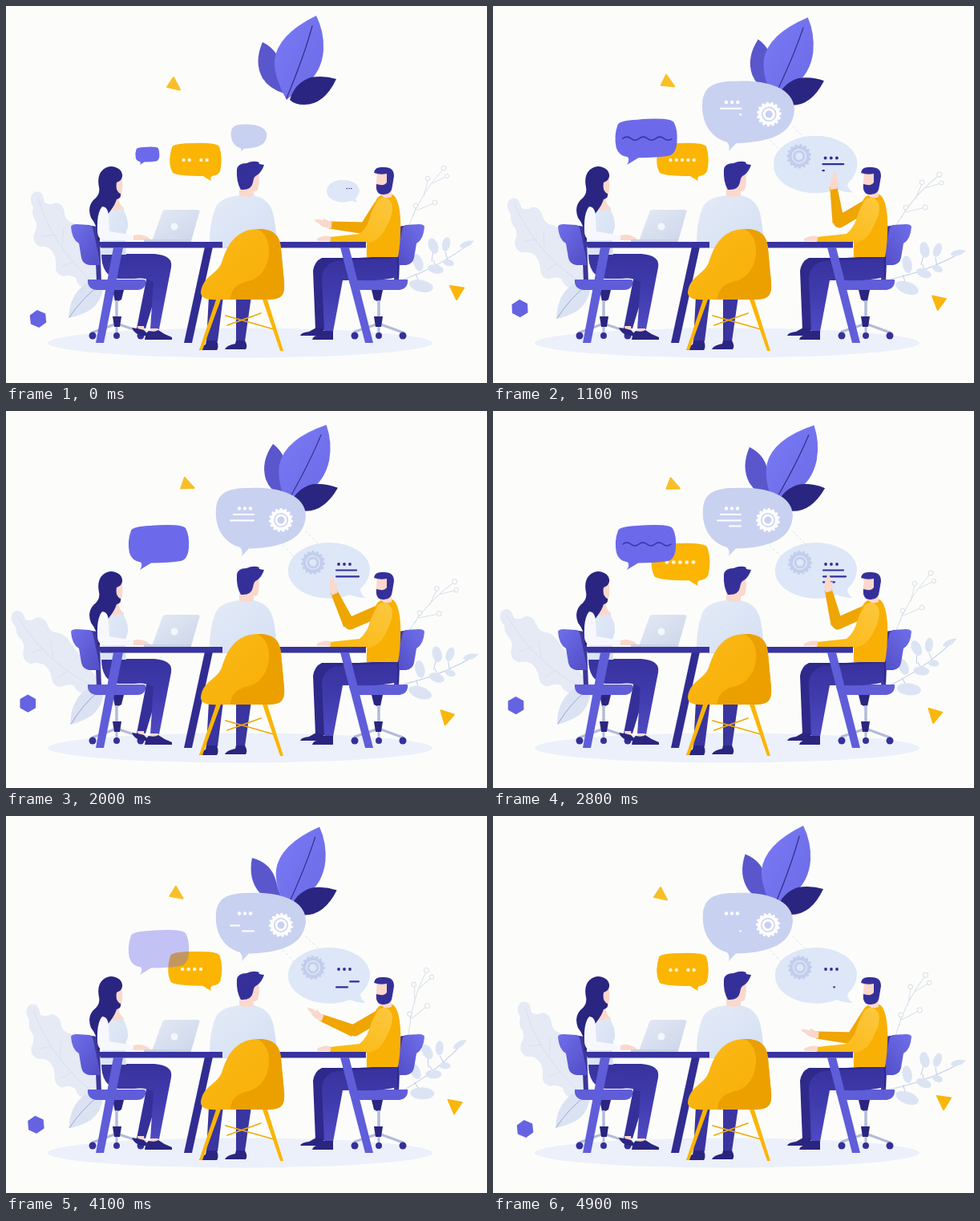
These frames come from a looping animation (600 px wide and 470 px high, 5000 ms). An HTML page:

```html
<!DOCTYPE html>
<html lang="en">
<head>
<meta charset="utf-8">
<title>Team meeting</title>
<style>
html,body{margin:0;width:100%;height:100%;overflow:hidden;background:#fcfdfb}
svg{display:block;width:100vw;height:100vh}
.ln{fill:none;stroke-linecap:round;stroke-linejoin:round}
.skin{fill:#fbd8cc}.dark{fill:#2a2580}.blue{fill:#605dd9}.navy{fill:#353099}
</style>
</head>
<body>
<svg viewBox="0 0 600 470">
<defs>
<linearGradient id="gLeaf" x1="0" y1="0" x2="1" y2="1"><stop stop-color="#7a7af5"/><stop offset="1" stop-color="#6c6ae6"/></linearGradient>
<linearGradient id="gBlue" x1="0" y1="0" x2="1" y2="1"><stop stop-color="#706fe9"/><stop offset="1" stop-color="#504cc6"/></linearGradient>
<linearGradient id="gPants" x1="0" y1="0" x2="0" y2="1"><stop stop-color="#37329d"/><stop offset=".5" stop-color="#413cae"/><stop offset="1" stop-color="#4f4ac2"/></linearGradient>
<linearGradient id="gSeat" x1="0" y1="0" x2="1" y2="1"><stop stop-color="#fbb91a"/><stop offset="1" stop-color="#f8ae02"/></linearGradient>
<linearGradient id="gSleeve" x1="1" y1="0" x2="0" y2="1"><stop stop-color="#fcc840"/><stop offset="1" stop-color="#fbb70c"/></linearGradient>
<linearGradient id="gShirt" x1="0" y1="0" x2="1" y2="1"><stop stop-color="#e4ebf7"/><stop offset="1" stop-color="#d4dff3"/></linearGradient>
<linearGradient id="gLid" x1="0" y1="0" x2="1" y2="1"><stop stop-color="#e4e9f4"/><stop offset="1" stop-color="#ccd6ea"/></linearGradient>
<g id="chair">
  <path fill="#3c3698" d="M100 273L114 275Q119 281 117 292L119 343H113L112 320Z"/>
  <path fill="url(#gBlue)" d="M81 275Q82 272 88 272L104 273Q108 274 109 280L118 323L104 323Q96 322 94 314L91 296Q82 291 81 275Z"/>
  <path class="blue" d="M102 341H172Q176 342 174 347Q172 354 164 354H112Q101 352 102 341Z"/>
  <path class="dark" d="M133 354H147L144 366L140 368H136Z"/>
  <path stroke="#b3bbd8" stroke-width="3.500" d="M138 367V388"/>
  <path class="ln" stroke="#b3bbd8" stroke-width="3" d="M108 407L138 396L168 406M138 396V408"/>
  <path class="dark" d="M133 387H144L142 400H135Z"/>
  <g class="navy"><circle cx="108" cy="411" r="4.500"/><circle cx="138" cy="411" r="4"/><circle cx="168" cy="411" r="4.500"/></g>
</g>
</defs>
<rect width="600" height="470" fill="#fcfdfb"/>
<ellipse cx="292" cy="420" rx="240" ry="18.500" fill="#ecf0fa"/>

<g id="bush">
  <path fill="#e5eaf5" d="M33 234Q38 229 44 233Q47 237 48 245Q55 249 62 245Q72 247 73 258Q74 266 80 269Q91 272 95 285L124 352Q108 356 96 351Q88 347 87 339Q80 334 71 337Q61 334 62 324Q63 312 57 305Q51 299 42 300Q32 295 35 284Q40 276 37 268Q31 260 34 251Q28 241 33 234Z"/>
  <path class="ln" stroke="#d9e0f0" d="M40 240Q60 305 115 350M61 285L45 287M70 299L72 276M84 319L70 325"/>
</g>
<g id="frond">
  <path fill="#dbe3f3" d="M78 389Q79 362 97 348Q108 341 122 343Q121 368 105 379Q93 386 78 389Z"/>
  <path class="ln" stroke="#8f93cc" stroke-width=".8" d="M79 388Q95 364 118 347"/>
</g>
<g id="twig" class="ln" stroke="#dadfe9">
  <path d="M501 278Q516 235 544 205M532 221L548 213M521 237L526 218M512 255L533 246M508 262L511 252"/>
  <g fill="#fcfdfb"><circle cx="546" cy="202" r="3"/><circle cx="550" cy="212" r="2.600"/><circle cx="526" cy="215" r="2.800"/><circle cx="535" cy="245" r="3"/><circle cx="511" cy="249" r="2.800"/></g>
</g>
<g id="sprig" fill="#dce4f4">
  <path class="ln" stroke="#c3cde4" d="M496 341Q540 326 583 293M548 307L551 317M533 317L537 326M531 318L533 304M511 334L516 346"/>
  <ellipse cx="574" cy="297" rx="8.500" ry="3.500" transform="rotate(-22 574 297)"/>
  <ellipse cx="549" cy="297" rx="5" ry="9" transform="rotate(12 549 297)"/>
  <ellipse cx="533" cy="299" rx="6" ry="10" transform="rotate(-20 533 299)"/>
  <ellipse cx="552" cy="320" rx="7" ry="4.200" transform="rotate(14 552 320)"/>
  <ellipse cx="536" cy="328" rx="10" ry="5.500" transform="rotate(12 536 328)"/>
  <ellipse cx="518" cy="349" rx="15" ry="7.500" transform="rotate(12 518 349)"/>
  <ellipse cx="514" cy="320" rx="6" ry="11" transform="rotate(-18 514 320)"/>
</g>
<path id="hex" fill="#6663e2" stroke="#6663e2" stroke-width="2" stroke-linejoin="round" d="M0-10L8.8-5V5L0 10L-8.8 5V-5Z"/>
<path id="tri1" fill="#f9bf27" stroke="#f9bf27" stroke-width="2" stroke-linejoin="round" d="M209 89L217 104.500L201 101Z"/>
<path id="tri2" fill="#fab60c" stroke="#fab60c" stroke-width="2" stroke-linejoin="round" d="M554 349L571 351.500L562 366Z"/>

<path id="leafL" fill="#5a57cd" d="M320 45Q342 56 343 80Q343 96 347 109Q328 103 320 90Q309 70 320 45Z"/>
<g id="leafM">
  <path fill="url(#gLeaf)" d="M387 12Q397 32 396 55Q394 82 374 98Q362 106 350 117Q334 88 335 68Q338 36 387 12Z"/>
  <path class="ln" stroke="#332d88" stroke-width="1.200" d="M382 25Q372 62 350 115"/>
</g>
<path id="leafR" class="dark" d="M412 91Q397 123 372 123Q360 123 354 117Q360 96 380 89Q396 86 412 91Z"/>

<g id="links" class="ln" stroke="#dce1ee" stroke-dasharray="3 3"><path d="M374 150L392 168M345 167L361 183"/></g>
<g id="bubA">
  <path fill="#c9d1f1" d="M262 121C264 103 275 96 302 96C335 94 373 102 374 130C373 149 362 159 346 165Q328 171 303 171.500L294 181Q296 175 292 170C271 164 260 145 262 121Z"/>
  <g id="inA" fill="#fff"><circle cx="291" cy="121.500" r="2.200"/><circle cx="298" cy="121.500" r="2.200"/><circle cx="305" cy="121.500" r="2.200"/>
    <g class="ln" stroke="#fff" stroke-width="2"><path id="a1" pathLength="1" d="M284 129H309"/><path id="a2" pathLength="1" d="M309 136.500H280"/><path id="a3" pathLength="1" d="M295 143.500H309"/></g>
    <g id="gearA"></g></g>
</g>
<g id="bubC">
  <path fill="#dde7f7" d="M352 199A51 34 0 0 1 454 197Q454 211 442 222Q442 229 449 233Q438 233 429 229A51 34 0 0 1 352 199Z"/>
  <g fill="#332d98"><circle cx="415" cy="191" r="1.900"/><circle cx="422" cy="191" r="1.900"/><circle cx="429" cy="191" r="1.900"/></g>
  <g class="ln" stroke="#332d98" stroke-width="2.200"><path id="c1" pathLength="1" d="M412 198.500H437"/><path id="c2" pathLength="1" d="M412 206.300H440"/><path id="c3" pathLength="1" d="M412 213.300H426"/></g>
  <g id="gearC"></g>
</g>
<g id="bubY">
  <path fill="#fbb502" d="M207 176Q209 171 235 171Q262 170 266 175Q271 190 267 206Q265 211 257 212Q254 214 256 218Q250 215 246 212Q215 212 208 208Q201 195 207 176Z"/>
  <g id="dots" fill="#fff3d2"></g>
</g>
<g id="bubB">
  <path fill="#6c6aea" d="M156 149Q158 144 180 143Q218 140 224 146Q229 155 228 170Q227 185 218 187Q205 189 181 189.500L167 198Q171 192 168 188.500Q157 187 154 177Q151 162 156 149Z"/>
  <path id="wave" class="ln" pathLength="1" stroke="#3934a4" stroke-width="1.500" d="M162 166q5-4 10 0t10 0t10 0t10 0t10 0t10 0"/>
</g>

<use href="#chair"/>
<use href="#chair" transform="matrix(-1 0 0 1 603 0)"/>

<g id="woman">
  <path class="navy" d="M176 336H194L174 402H163Z"/>
  <path fill="url(#gPants)" d="M119 309L185 309Q209 311 206 326L191 403H180L184 344Q174 338 160 340H140Q119 337 119 309Z"/>
  <path class="skin" d="M164 399H172L173 405H165ZM180 402H190L189 408H181Z"/>
  <path class="dark" d="M157 401Q166 402 172 404L179 411H170Q160 409 157 401ZM178 405Q186 407 190 404Q198 410 207 413V416H173Q174 408 178 405Z"/>
  <path class="skin" d="M131 236H140Q140 247 147 252V260L126 262Z"/>
  <path fill="url(#gShirt)" d="M124 249Q134 259 145 252Q153 264 152 276Q147 285 150 310H118Z"/>
  <path class="skin" d="M136 212H144Q146 222 145 229Q144 238 140 238Q134 236 134 224Z"/>
  <path class="dark" d="M142 204Q131 196 121 204Q113 211 116 226Q118 235 109 242Q101 251 106 264Q116 276 114 293Q121 288 120 276Q120 266 129 257Q136 248 138 241Q144 240 143 234Q136 231 138 220Q146 217 145 210Q144 206 142 204Z"/>
  <path fill="#f7f8fe" d="M120 250Q128 250 128 264L129 281L160 286V292H124Q114 292 114 280Q113 258 120 250Z"/>
  <path class="skin" d="M159 286Q168 283 178 289L181 292H159Z"/>
</g>
<path fill="url(#gLid)" d="M199 254H239Q243 255 241 258L231 293H182L195 257Q196 254 199 254Z"/>
<path fill="#c9d1e5" d="M172 291H231V294H172Z"/>
<circle cx="210" cy="275" r="4.500" fill="#f3f6fc"/>

<g id="man">
  <path fill="#2e298a" d="M394 314H440L490 311V338H425L405 342L398 404H386L383 330Q385 318 394 314Z"/>
  <path fill="url(#gPants)" d="M412 318L488 314V338Q470 343 440 342H420L408 406H397L394 338Q396 322 412 318Z"/>
  <path class="dark" d="M387 401L397 403L393 411H367Q368 407 378 406ZM396 405H408V416H382Q383 411 391 410Z"/>
  <path id="upper" class="ln" stroke="#efa502" stroke-width="15"/>
  <path id="fore" fill="#efa502"/>
  <path id="hand" class="skin" d="M3-4Q-3-5-6-7Q-9-9-8-5Q-15-7-19-5Q-19-3-13-1Q-10 4 3 4Z"/>
  <path fill="#f9b004" d="M462 241Q467 233 482 235Q490 239 492 265Q493 290 489 313H450Q449 290 454 262Z"/>
  <path class="skin" d="M463 207H481V238Q471 242 467 234L461 229Z"/>
  <path class="navy" d="M459 208Q460 200 470 201Q484 200 484 212L482 224Q481 236 470 235Q461 235 462 222Q472 225 475 220V209Q467 211 459 208Z"/>
  <path fill="url(#gSleeve)" d="M464 242Q474 234 481 246Q484 258 475 274Q467 293 452 295H404V288L441 284Q452 275 456 257Z"/>
  <path class="skin" d="M405 287Q397 285 388 290V293H405Z"/>
</g>

<path fill="#312c92" d="M248 300H258L232 420H222Z"/>
<path fill="#38339f" d="M115 294H449V301.500H118Z"/>
<path class="blue" d="M134 301H146L122 420H112ZM417 301H428L458 420H448Z"/>

<g id="centre">
  <path class="skin" d="M291 225H309V238Q300 245 291 237Z"/>
  <path class="skin" d="M306 207H315Q317 220 314 229Q311 233 302 229Z"/>
  <path class="navy" d="M288 204Q289 196 300 196Q309 192 316 195Q313 197 322 198Q319 207 313 211Q309 212 308 220Q306 230 293 229Q287 219 288 204Z"/>
  <path fill="url(#gShirt)" d="M291 236Q300 240 309 236Q328 240 333 258Q337 275 338 300L270 302V294H254Q254 268 262 250Q269 238 291 236Z"/>
  <path fill="#3a359f" d="M253 362H271L264 418H250ZM287 362H306L298 418H287Z"/>
  <path class="dark" d="M250 417H263Q266 425 263 429H241Q243 424 249 422ZM287 417H298Q302 424 299 428H273Q275 423 286 421Z"/>
  <path class="ln" stroke="#efaa0a" stroke-width="1.800" d="M274 386L334 403M318 383L276 398"/>
  <path fill="#fab505" d="M263 363H269L245 429H241ZM319 363H325L346 430H342Z"/>
  <path fill="url(#gSeat)" d="M243 357C245 337 263 335 269 320C276 298 286 279 313 278C333 277 342 286 343 302L347 345C348 362 343 366 325 366H265C250 367 243 364 243 357Z"/>
  <path fill="#eba000" d="M313 278C333 277 342 286 343 302L347 345C348 362 343 366 325 366H280C281 350 290 346 306 342C331 334 337 288 313 278Z"/>
</g>
</svg>
<script>
const LOOP = 5000, STEP = 100;
const $ = id => document.getElementById(id);
const set = (id, k, v) => $(id).setAttribute(k, v);
const move = (id, v) => set(id, 'transform', v);
const ramp = (t, a, b) => Math.min(1, Math.max(0, (t - a) / (b - a)));
const ease = p => (1 - Math.cos(Math.PI * p)) / 2;

// Smooth curve through [time, value] points
function spline(t, k) {
  let i = 0;
  while (i < k.length - 2 && t >= k[i + 1][0]) i++;
  const slope = j => {
    const a = k[Math.max(0, j - 1)], b = k[Math.min(k.length - 1, j + 1)];
    return (b[1] - a[1]) / (b[0] - a[0]);
  };
  const [t0, v0] = k[i], [t1, v1] = k[i + 1], d = t1 - t0, p = (t - t0) / d, q = 1 - p;
  return q * q * (1 + 2 * p) * v0 + p * p * (3 - 2 * p) * v1 +
    d * p * q * (q * slope(i) - p * slope(i + 1));
}

const scaleAt = (s, x, y) => `translate(${x} ${y}) scale(${s}) translate(${-x} ${-y})`;

function trim(id, from, to) {
  set(id, 'visibility', to - from > 0.001 ? 'visible' : 'hidden');
  set(id, 'stroke-dasharray', `${Math.max(0, to - from)} 2`);
  set(id, 'stroke-dashoffset', -from);
}

function gear(id, color, hole) {
  let s = `<circle r="11" fill="none" stroke="${color}" stroke-width="4"/>`;
  for (let a = 0; a < 360; a += 24)
    s += `<rect x="-1.600" y="-15" width="3.200" height="4" rx="1" fill="${color}" transform="rotate(${a})"/>`;
  $(id).innerHTML = s + `<circle r="6" fill="${hole}" stroke="${color}" stroke-width="3"/>`;
}
gear('gearA', '#fff', '#c9d1f1');
gear('gearC', '#c3ceec', '#dde7f7');
$('dots').innerHTML = [0, 1, 2, 3, 4].map(i => `<circle cx="${221.5 + 7.3 * i}" cy="192" r="2.200"/>`).join('');

function drawArm(t) {
  const x = spline(t, [[0, 448], [500, 440], [1100, 431], [2000, 428], [2800, 429], [3400, 432], [4100, 434], [4900, 448]]);
  const y = spline(t, [[0, 277], [500, 275], [1100, 270], [2000, 266], [2800, 266], [3400, 266], [4100, 268], [4900, 277]]);
  const deg = spline(t, [[0, 5], [500, 40], [1100, 82], [2000, 65], [2800, 76], [3400, 25], [4100, 22], [4900, 5]]);
  const a = deg * Math.PI / 180, c = Math.cos(a), s = Math.sin(a), len = 45;
  const wx = x - len * c, wy = y - len * s;
  const at = (px, py, w) => `${px + s * w} ${py - c * w}`;
  set('upper', 'd', `M466 249L${x + 1} ${y - 1}`);
  set('fore', 'd', `M${at(x, y, 7.5)}L${at(wx, wy, 4.5)}L${at(wx, wy, -4.5)}L${at(x, y, -7.5)}Z`);
  move('hand', `translate(${wx} ${wy}) rotate(${deg})`);
}

function draw(t) {
  const drift = ease(t < 2200 ? t / 2200 : ramp(t, 4900, 2200));
  const sway = (1 - Math.cos(2 * Math.PI * t / LOOP)) / 2;

  move('leafM', `rotate(${7.8 * sway} 350 117)`);
  move('leafR', `rotate(${5 * sway} 352 118)`);
  move('leafL', `rotate(${spline(t, [[0, 0], [1100, 9.5], [1600, 12.5], [2000, 11.5], [2800, 0], [3400, -10], [4000, -13], [4900, -5]])} 346 108)`);
  move('bush', `rotate(${-14 * drift} 100 350)`);
  move('frond', `rotate(${-3 * drift} 120 345)`);
  move('twig', `rotate(${spline(t, [[0, 0], [1100, 9], [1800, 13], [2800, 0], [3400, -14], [4000, -16.5], [4900, -5]])} 500 275)`);
  move('sprig', `rotate(${spline(t, [[0, 0], [1100, 8], [1500, 9], [2000, 7], [2800, -6.4], [3500, -12.3], [4100, -10], [4900, 8]])} 500 340)`);
  move('hex', `translate(${40 - 13 * drift} ${390 - 26 * drift}) rotate(${-6 + 6 * drift})`);
  move('tri1', `translate(${16.5 * drift} ${-6.5 * drift}) rotate(${-15 * drift} 209 98)`);
  move('tri2', `translate(${-13 * drift} ${26 * drift}) rotate(${9 * drift} 562 356)`);

  const pop = t < 1500 ? spline(t, [[0, 0.4], [400, 0.9], [700, 1.05], [1100, 1.025], [1500, 1]]) : 1;
  move('bubA', scaleAt(pop, 293, 182));
  move('bubC', scaleAt(pop, 432, 252));
  move('bubB', scaleAt(pop, 167, 198));
  set('bubB', 'opacity', 1 - ramp(t, 3950, 4200));
  set('inA', 'opacity', ramp(t, 100, 500));
  set('gearC', 'opacity', ramp(t, 100, 500));
  set('links', 'opacity', ramp(t, 600, 1000));
  move('gearA', `translate(343 136) rotate(${t * 0.036})`);
  move('gearC', `translate(383 189) rotate(${-t * 0.036})`);

  const yellow = t < 2200 ? 1 : t < 2400 ? 0.4 :
    spline(t, [[2400, 0.4], [2800, 1.13], [3100, 1.02], [3400, 0.95], [4100, 1.04], [4900, 1]]);
  move('bubY', scaleAt(yellow, 256, 218));
  set('bubY', 'opacity', t < 2200 ? 1 - ramp(t, 1500, 1900) : ramp(t, 2300, 2500));
  const slot = t < 2200 ? Math.floor(2 + t / 330) : Math.floor(26.1 + (t - 3400) / 250);
  [...$('dots').children].forEach((d, i) => d.setAttribute('opacity', slot % 6 === i ? 0 : 1));

  if (t < 2000) trim('wave', ramp(t, 1150, 1800), ramp(t, 400, 1000));
  else trim('wave', ramp(t, 2900, 3700), ramp(t, 2100, 2700));
  for (const b of 'ac') {
    trim(b + 1, ramp(t, 2900, 3300), ramp(t, 800, 1100));
    trim(b + 2, ramp(t, 3550, 4450), ramp(t, 1080, 1500));
    trim(b + 3, ramp(t, 4350, 4930), ramp(t, 2300, 2800));
  }
  drawArm(t);
}

const start = performance.now();
function tick() {
  const t = (performance.now() - start) % LOOP;
  draw(Math.floor(t / STEP) * STEP);
  requestAnimationFrame(tick);
}
tick();
</script>
</body>
</html>
```
